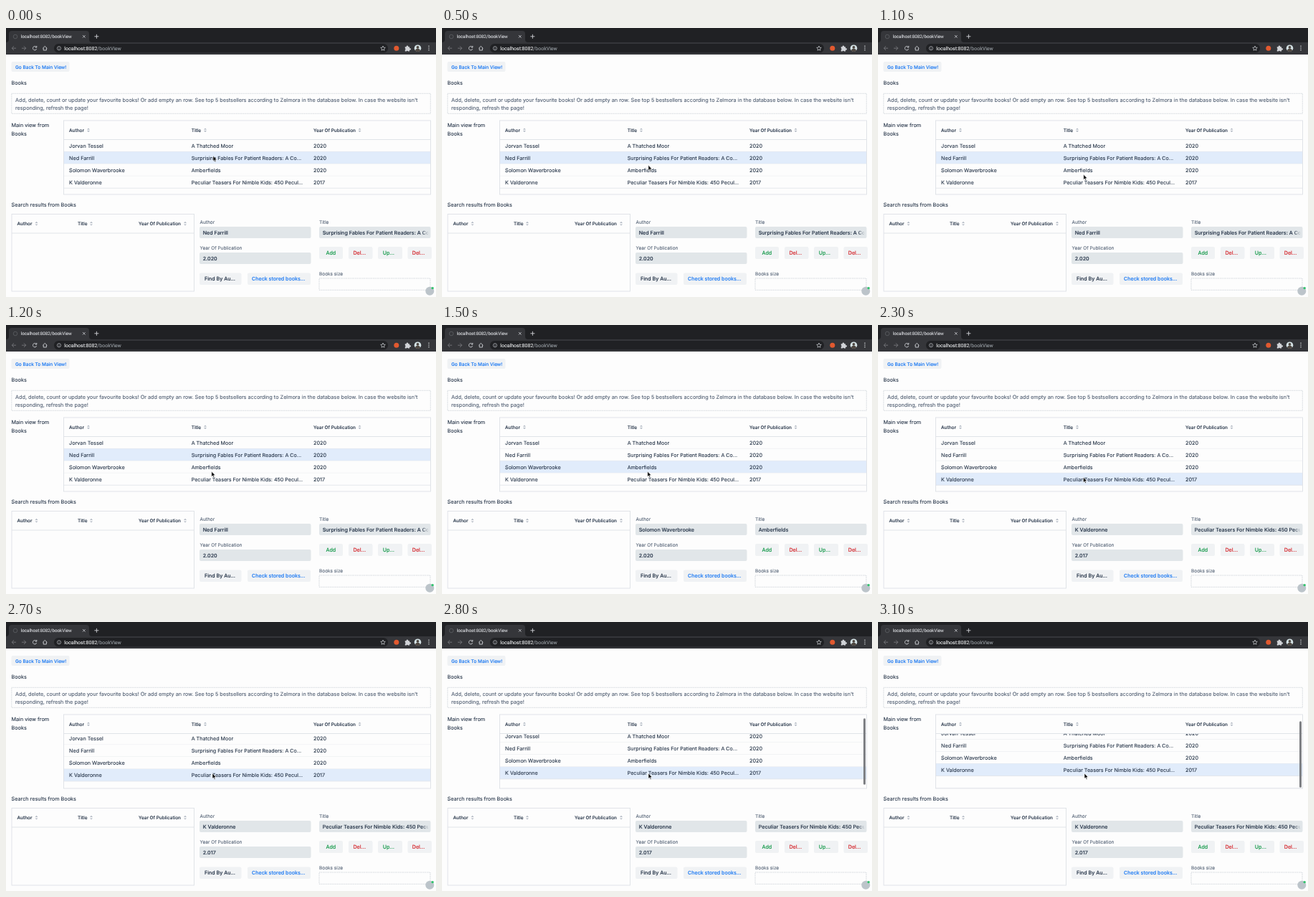
These frames come from a looping animation (600x375 px, 3200 ms). An HTML page:

```html
<!DOCTYPE html>
<html lang="en">
<head>
<meta charset="utf-8">
<title>Books</title>
<style>
  html, body { margin: 0; width: 100%; height: 100%; overflow: hidden; background: #fdfdfd; }
  svg { display: block; width: 100vw; height: 100vh; }
  text {
    font-family: Inter, "Open Sans", sans-serif; font-size: 7.25px; color: #223145;
    fill: currentColor; stroke: currentColor; stroke-width: .1px;
    white-space: pre; text-rendering: geometricPrecision;
  }
  tspan { fill: currentColor; stroke: currentColor; }
  .head { font-size: 6.45px; font-weight: 500; }
  .label { font-size: 6.5px; color: #566477; }
  .note { font-size: 7.28px; color: #4d5b6f; }
  .cell { font-size: 7.15px; }
  .value { font-size: 7.15px; font-weight: 500; }
  .btn { font-size: 7.1px; font-weight: 500; }
  .small { font-size: 6.5px; font-weight: 500; }
  .chrome { font-family: Roboto, sans-serif; font-size: 6.25px; color: #dfe1e5; }
  .url { font-family: Roboto, sans-serif; font-size: 7px; color: #f1f3f4; }
  .path { color: #9aa0a6; }
</style>
</head>
<body>
<svg id="stage" viewBox="0 0 600 375"></svg>
<script>
const LOOP = 3200, STEP = 100, ROW = 16.95, TOP = 155.5, MAX_SCROLL = 8.8;
const PAGE = '#fdfdfd', FIELD = '#e1e6e9', LINE = '#dde1e6', INK = '#223145';
const BLUE = '#1676f3', GREEN = '#169a4b', RED = '#d5292f', LIGHT = '#d2d4d8', DIM = '#76787c';

const books = [
  { author: 'Jorvan Tessel', title: 'A Thatched Moor', year: 2020 },
  { author: 'Ned Farrill', title: 'Surprising Fables For Patient Readers: A Collection', year: 2020 },
  { author: 'Solomon Waverbrooke', title: 'Amberfields', year: 2020 },
  { author: 'K Valderonne', title: 'Peculiar Teasers For Nimble Kids: 450 Peculiar Teasers', year: 2017 }
];

const shorten = s => s.length > 43 ? s.slice(0, 43) + '...' : s;
const text = (x, y, s, cls = '', extra = '') => `<text x="${x}" y="${y}" class="${cls}" ${extra}>${s}</text>`;
const rect = (x, y, w, h, fill, extra = '') =>
  `<rect x="${x}" y="${y}" width="${w}" height="${h}" fill="${fill}" ${extra}/>`;
const circle = (x, y, r, fill, extra = '') => `<circle cx="${x}" cy="${y}" r="${r}" fill="${fill}" ${extra}/>`;
const shape = (d, fill) => `<path d="${d}" fill="${fill}"/>`;
const stroke = (d, color, w = .9) => `<path d="${d}" fill="none" stroke="${color}" stroke-width="${w}"/>`;
const frame = (x, y, w, h) => rect(x, y, w, h, 'none', `stroke="${LINE}" stroke-width=".9"`);
const dashed = (x, y, w, h) =>
  rect(x, y, w, h, 'none', 'stroke="#bcc3cb" stroke-width=".65" stroke-dasharray="1.5 1"');
const sorter = (x, y) => shape(`M${x - 2} ${y - .7}l2-2.2 2 2.2zM${x - 2} ${y + .7}l2 2.2 2-2.2z`, '#b3bac4');
const header = (x, y, s, iconX) => text(x, y, s, 'head') + sorter(iconX, y - 2.4);
const button = (x, y, w, h, tx, s, color, cls = 'btn') =>
  rect(x, y, w, h, '#f0f2f4', 'rx="2"') + text(tx, y + h / 2 + 2.6, s, cls, `style="color:${color}"`);
const field = (x, y, id) => rect(x, y, 155.5, 16, FIELD, 'rx="2"') +
  text(x + 4.7, y + 10.8, '', 'value', `id="${id}" clip-path="url(#inputs)"`);

function browser() {
  return rect(0, 0, 600, 37, '#35363a') + rect(0, 0, 600, 20, '#202124') +
    shape('M0 20Q4 20 4 16V8Q4 4 8 4H112Q116 4 116 8V16Q116 20 120 20Z', '#35363a') +
    circle(13, 12, 2.8, 'none', 'stroke="#5e6064" stroke-width=".8"') +
    text(20.7, 14.1, 'localhost:8082/bookView', 'chrome') +
    stroke('M107 10l3.6 3.6M110.6 10l-3.6 3.6', LIGHT, .8) +
    stroke('M123.4 11.8h6M126.4 8.8v6', LIGHT) +
    stroke('M14 28.2H8.2M11 25.4l-2.8 2.8 2.8 2.8', DIM) +
    stroke('M22 28.2h5.8M25 25.4l2.8 2.8-2.8 2.8', DIM) +
    stroke('M42.4 26.6A2.7 2.7 0 1 0 42.7 29.2M42.8 24.9v2.2h-2.2', LIGHT) +
    stroke('M51.3 28.3L54.3 25.4 57.3 28.3M52.2 27.8V31H56.4V27.8', LIGHT) +
    rect(67, 22, 466, 12.6, '#202124', 'rx="6.3"') +
    circle(74, 28.3, 2.6, 'none', 'stroke="#b4b7bc" stroke-width=".75"') +
    stroke('M74 28v1.7M74 26.7v.6', '#b4b7bc', .7) +
    text(81.3, 30.6, 'localhost:8082<tspan class="path">/bookView</tspan>', 'url') +
    stroke('M526 25l.9 2.2 2.4.2-1.8 1.6.5 2.3-2-1.2-2 1.2.5-2.3-1.8-1.6 2.4-.2z', LIGHT, .7) +
    circle(544.8, 28.2, 3.5, '#e2592f') +
    shape('M556.8 26.3h2a1.3 1.3 0 1 1 2.3 0h2v2a1.3 1.3 0 1 1 0 2.3v1.9h-2.1a1.2 1.2 0 0 0-2.2 0h-2v-2a1.2 1.2 0 0 0 0-2.2z', LIGHT) +
    circle(574.5, 28.2, 4.8, '#d5e3e6') + circle(574.5, 26.8, 1.9, '#4d4640') +
    shape('M571 31.5q.4-2.8 3.5-2.8t3.5 2.8a4.8 4.8 0 0 1-7 0z', '#4d4640') +
    [25.2, 28, 30.8].map(y => circle(590, y, .8, LIGHT)).join('');
}

function tableRows() {
  return books.map((b, i) => {
    const y = TOP + i * ROW, base = y + 11.2;
    return rect(80.5, y, 512, ROW, PAGE, `id="row${i}"`) +
      stroke(`M80.5 ${y + ROW}H592.5`, LINE, .7) +
      text(88, base, b.author) + text(258.7, base, shorten(b.title), 'cell') + text(429, base, b.year);
  }).join('') + stroke(`M80.5 ${TOP + 5 * ROW}H592.5`, LINE, .7);
}

function page() {
  return `<defs>
    <clipPath id="body"><rect x="80" y="155.5" width="513" height="76"/></clipPath>
    <clipPath id="inputs"><rect x="270" y="277" width="320" height="60"/></clipPath>
    <linearGradient id="fade">
      <stop stop-color="${FIELD}" stop-opacity="0"/><stop offset="1" stop-color="${FIELD}"/>
    </linearGradient>
  </defs>` + rect(0, 0, 600, 375, PAGE) + browser() +
    button(7.5, 47, 81, 14, 13, 'Go Back To Main View!', BLUE, 'small') +
    text(7.5, 79, 'Books') + dashed(7.8, 91.3, 584.5, 28) +
    text(13, 103, "Add, delete, count or update your favourite books! Or add empty an row. See top 5 bestsellers according to Zelmora in the database below. In case the website isn't", 'note') +
    text(13, 113.5, 'responding, refresh the page!', 'note') +
    text(7.5, 137.7, 'Main view from') + text(7.5, 150.1, 'Books') +
    `<g clip-path="url(#body)"><g id="rows">${tableRows()}</g></g>` +
    frame(80.5, 129, 512, 103) + stroke('M80.5 155.5H592.5', LINE) +
    header(88, 144.8, 'Author', 115) + header(258.7, 144.8, 'Title', 278) +
    header(429, 144.8, 'Year Of Publication', 493.5) +
    rect(588, 138.2, 3, 92.5, '#7f8185', 'rx="1.5" id="thumb"') +
    text(7.5, 248.6, 'Search results from Books') +
    frame(8, 259.5, 254.5, 107.5) + stroke('M8 286H262.5', LINE) +
    header(15.5, 275.1, 'Author', 42.5) + header(100, 275.1, 'Title', 119) +
    header(185, 275.1, 'Year Of Publication', 250) +
    text(270.5, 272.5, 'Author', 'label') + field(270, 277, 'author') +
    text(270.5, 308.8, 'Year Of Publication', 'label') + field(270, 313, 'year') +
    text(437, 272.5, 'Title', 'label') + field(437, 277, 'title') +
    rect(580, 278, 10, 14, 'url(#fade)') +
    button(437, 305, 33, 17, 446.5, 'Add', GREEN) + button(478, 305, 33.5, 17, 484.5, 'Del...', RED) +
    button(519, 305, 34, 17, 525.7, 'Up...', GREEN) + button(560.5, 305, 33.5, 17, 566.8, 'Del...', RED) +
    button(270, 341.5, 58.5, 16.5, 277, 'Find By Au...', INK) +
    button(337, 341.5, 88, 16.5, 343, 'Check stored books...', BLUE) +
    text(437, 344.8, 'Books size', 'label') + dashed(437, 349, 155, 16.3) +
    circle(591.3, 366.7, 6, '#bcc4ca') + circle(595.2, 362.6, 1.7, '#2fc26b') +
    '<path id="cursor" d="M0 0V7.3L1.7 5.8 2.8 8.4 4 7.9 2.9 5.4H5.2Z" stroke="#fff" stroke-width=".6"/>';
}

const $ = id => document.getElementById(id);
$('stage').innerHTML = page();

const clamp = v => Math.max(0, Math.min(1, v));
const ease = v => v * v * (3 - 2 * v);

// Keys are [time, x, y], eased in between.
const path = [[100, 289, 178.3], [900, 286.8, 204.2], [1700, 286.8, 204.2],
  [2100, 286.4, 212.2], [2400, 286.4, 212.2], [2700, 288, 211]];

function cursorAt(t) {
  let [, x, y] = path[0];
  for (let i = 1; i < path.length; i++) {
    const [t0, x0, y0] = path[i - 1], [t1, x1, y1] = path[i];
    if (t < t0) break;
    const k = ease(clamp((t - t0) / (t1 - t0)));
    x = x0 + (x1 - x0) * k;
    y = y0 + (y1 - y0) * k;
  }
  return [x, y];
}

function draw(ms) {
  const t = Math.floor((ms % LOOP) / STEP) * STEP;
  const pick = t < 1300 ? 1 : t < 2300 ? 2 : 3;
  const scroll = MAX_SCROLL * ease(clamp((t - 2600) / 400));
  const book = books[pick];
  books.forEach((b, i) => $('row' + i).setAttribute('fill', i === pick ? '#e1ecfb' : PAGE));
  $('rows').setAttribute('transform', `translate(0 ${-scroll})`);
  $('thumb').setAttribute('transform', `translate(0 ${(scroll - MAX_SCROLL) * .9})`);
  $('thumb').setAttribute('opacity', clamp((t - 2700) / 100));
  $('author').textContent = book.author;
  $('title').textContent = book.title;
  $('year').textContent = (book.year / 1000).toFixed(3);
  $('cursor').setAttribute('transform', `translate(${cursorAt(t)})`);
}

const start = performance.now();
function tick() {
  draw(performance.now() - start);
  requestAnimationFrame(tick);
}
tick();
</script>
</body>
</html>
```
